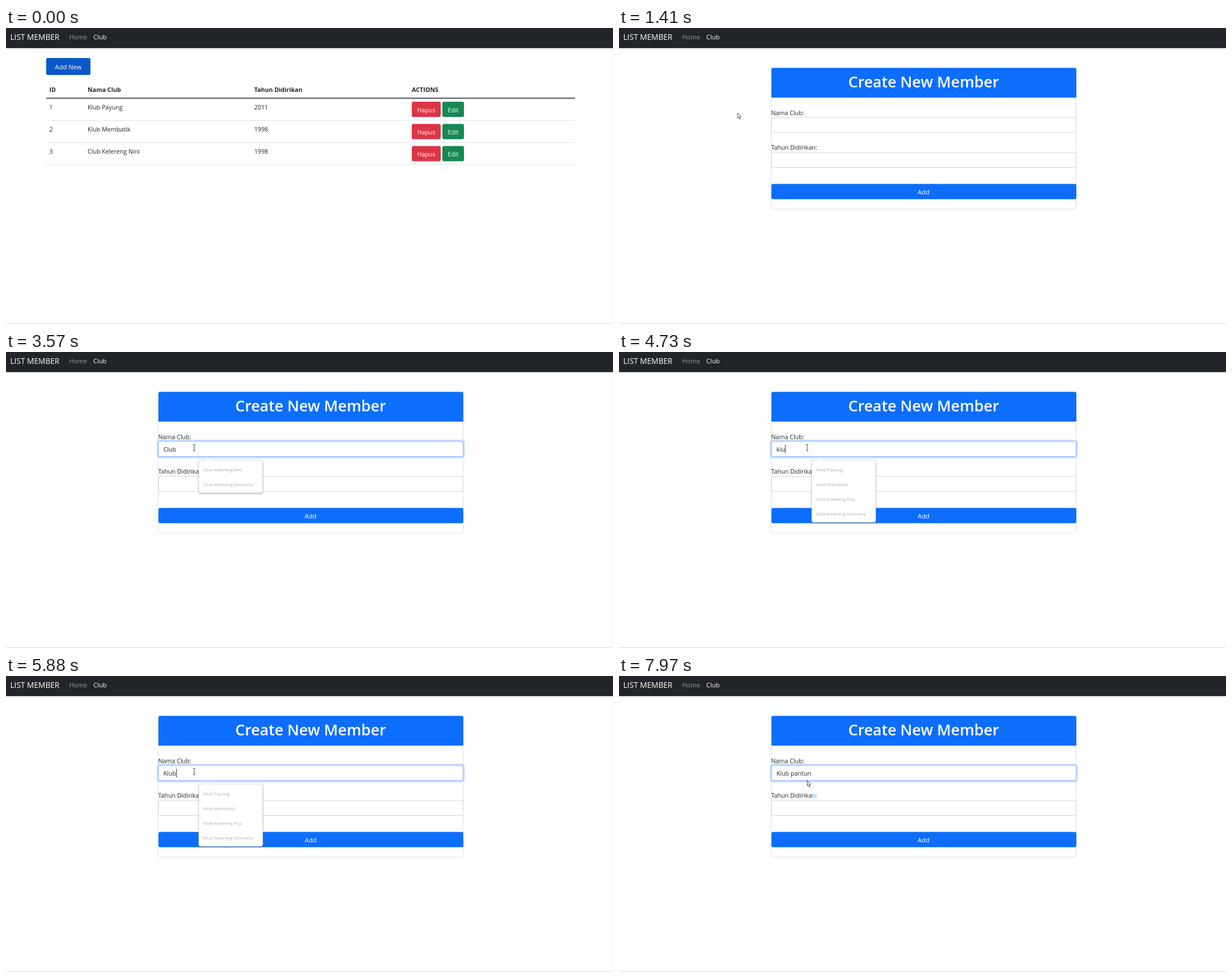
An HTML page for the animation above (8000 ms loop, 1071 px wide and 523 px high).

```html
<!DOCTYPE html>
<html lang="id">
<head>
<meta charset="utf-8">
<title>List Member</title>
<style>
  html, body { margin: 0; width: 100%; height: 100%; overflow: hidden; background: #fff; }
  svg { display: block; width: 100%; height: 100%; }
  text { font: 10.7px "Open Sans", "Noto Sans", sans-serif; fill: #212529; white-space: pre; }
  .bold { font-weight: 700; }
  .light { fill: #fff; }
  .wide { font-size: 11.2px; }
  .brand { font-size: 13.7px; }
  .title { font-size: 26.8px; font-weight: 600; }
  .middle { text-anchor: middle; }
  .suggestion { font-size: 8px; fill: #adadad; }
  .field { fill: #fff; stroke: #ced4da; }
  .menu { fill: #fff; stroke: #d6d6d6; stroke-width: .8; filter: drop-shadow(0 1px 1px #0005); }
</style>
</head>
<body>
<svg viewBox="0 0 1071 523">
  <rect x="1069.5" y="36" width="1.5" height="487" fill="#f8f8f8"/>
  <rect y="522" width="1071" height="1" fill="#d9d9d9"/>
  <rect width="1071" height="35.6" fill="#212529"/>
  <text class="light brand" x="7.5" y="21">LIST MEMBER</text>
  <text class="wide" x="111.5" y="20" style="fill:#9b9d9f">Home</text>
  <text class="light wide" x="154" y="20">Club</text>

  <g id="listPage">
    <rect id="buttonRing" x="69.5" y="51.5" width="81" height="33" rx="4" fill="none" stroke="#9ec5fe" stroke-width="3"/>
    <rect x="71" y="53" width="78" height="30" rx="3" fill="#0a58ca"/>
    <text class="light wide middle" x="110" y="73">Add New</text>
    <g id="table"></g>
  </g>

  <g id="formPage">
    <rect x="268.5" y="70.5" width="538" height="249.5" rx="3" fill="#fff" stroke="#dfdfdf"/>
    <path d="M269 123V73.5a3 3 0 0 1 3-3H804a3 3 0 0 1 3 3V123Z" fill="#0d6efd"/>
    <text class="light title middle" x="537.5" y="105">Create New Member</text>
    <text x="268.5" y="153.7">Nama Club:</text>
    <text x="268.5" y="215.4">Tahun Didirika<tspan id="labelEnd">n:</tspan></text>
    <rect class="field" x="269" y="157.9" width="537.5" height="26.8" rx="3"/>
    <rect class="field" x="269" y="219.6" width="537.5" height="26.8" rx="3"/>
    <rect id="focusBorder" x="269" y="157.9" width="537.5" height="26.8" rx="3" fill="none" stroke="#86b7fe"/>
    <rect id="focusRing" x="267.3" y="156.2" width="540.9" height="30.2" rx="4" fill="none" stroke="#c2dbfe" stroke-width="2.6"/>
    <rect x="269" y="275.4" width="538" height="27" rx="3" fill="#0d6efd"/>
    <text class="light wide middle" x="537.5" y="293.6">Add</text>
    <text id="typed" x="277.8" y="176.4"></text>
    <rect id="caret" y="164" width="1" height="15" fill="#212529"/>
    <g id="menu">
      <rect id="menuBox" class="menu" x="340" y="191" width="113" rx="3"/>
      <path d="M349.5 191.6L355.5 186L361.5 191.6" fill="#fff" stroke="#dcdcdc" stroke-width=".7"/>
      <g id="menuRows"></g>
    </g>
  </g>

  <circle id="click" r="8.7" cx="-1.2" fill="#fff03c"/>
  <path id="arrow" d="M0 0V9.3L2.1 7.4L3.7 10.9L5.2 10.3L3.7 6.8H6.4Z" fill="#fff" stroke="#222" stroke-width=".8"/>
  <path id="beam" d="M-2-5.5H-.6L0-5L.6-5.5H2M0-5V5M-2 5.5H-.6L0 5L.6 5.5H2" fill="none" stroke="#444" stroke-width="1"/>
</svg>
<script>
const LOOP = 8000, PAGE_SWITCH = 1090, FOCUS = 2020, STEP = 70, FADE = 210;
const $ = id => document.getElementById(id);
const clamp = v => Math.min(1, Math.max(0, v));
const label = (x, y, content, cls = "") => `<text class="${cls}" x="${x}" y="${y}">${content}</text>`;
const show = (id, visible) => { $(id).style.display = visible ? "" : "none"; };

const clubs = [
  ["Klub Payung", 2011],
  ["Klub Membatik", 1998],
  ["Club Kelereng Nini", 1998],
];
const suggestions = [
  "Klub Payung", "Klub Membatik", "Klub Kelereng Pop",
  "Klub Kelereng Nininana", "Club Kelereng Nininana", "Club Kelereng Nini",
];

// time, field content, indexes of the suggestions on view
const edits = [
  [FOCUS, "", "012345"],
  [2480, "C", "45"], [2750, "Cl", "54"], [2950, "Clu", "54"], [3020, "Club", "54"],
  [3640, "Clu", "54"], [4120, "Cl", "54"], [4190, "C", "54"], [4260, "", ""],
  [4460, "k", "0123"], [4530, "kl", "0123"], [4730, "klu", "0123"],
  [5000, "kl", "0123"], [5200, "k", "0123"], [5270, "", ""],
  [5540, "K", "0123"], [5680, "Kl", "0123"], [5810, "Klu", "0123"], [5880, "Klub", "0123"],
  [6030, "Klub ", "0123"], [6230, "Klub p", ""], [6700, "Klub pa", ""], [6900, "Klub pan", ""],
  [7100, "Klub pant", ""], [7230, "Klub pantu", ""], [7300, "Klub pantun", ""],
];

// time, x, y of the pointer
const route = [
  [130, 1010, 512], [470, 560, 290], [810, 95, 73], [PAGE_SWITCH, 95, 73],
  [1410, 209, 150], [1740, 338, 175], [2090, 338, 175], [2280, 332, 169],
  [7760, 332, 169], [7830, 328, 160], [7900, 330, 172], [7970, 332, 185],
];

function buildTable() {
  const columns = [76.5, 144, 438, 716];
  const rule = (y, color, width) =>
    `<path d="M71 ${y}H1004" stroke="${color}" stroke-width="${width}"/>`;
  const button = (x, y, width, color, content) =>
    `<rect x="${x}" y="${y}" width="${width}" height="27" rx="3" fill="${color}"/>` +
    label(x + width / 2, y + 18.7, content, "light middle");
  const head = ["ID", "Nama Club", "Tahun Didirikan", "ACTIONS"]
    .map((name, i) => label(columns[i], 113.4, name, "bold")).join("");
  const rows = clubs.map((club, i) => {
    const y = 124 + i * 39.2;
    return [i + 1, ...club].map((cell, c) => label(columns[c], y + 19.5, cell)).join("") +
      button(716, y + 6.2, 51, "#dc3545", "Hapus") +
      button(770, y + 6.2, 38, "#198754", "Edit") +
      rule(y + 39.3, "#dee2e6", 1);
  }).join("");
  $("table").innerHTML = head + rows + rule(124, "#212529", 1.4);
}

const lastIndex = (list, t) => list.findLastIndex(item => item[0] <= t);

function pointerAt(t) {
  const i = lastIndex(route, t);
  const [start, x, y] = route[i];
  const [end, nextX, nextY] = route[i + 1] || [start + 1, x, y];
  const p = clamp(Math.floor((t - start) / STEP) * STEP / (end - start));
  return [x + (nextX - x) * p, y + (nextY - y) * p];
}

function drawPointer(t) {
  const visible = t >= route[0][0];
  const [x, y] = visible ? pointerAt(t) : [0, 0];
  const overField = t >= PAGE_SWITCH && x > 269 && y > 158 && y < 185;
  const clicking = [880, FOCUS].some(start => t >= start && t < start + 2 * STEP);
  show("arrow", visible && !overField);
  show("beam", visible && overField);
  show("click", clicking);
  for (const id of ["arrow", "beam", "click"]) $(id).setAttribute("transform", `translate(${x} ${y})`);
}

function drawField(t) {
  const i = lastIndex(edits, t);
  const focused = i >= 0;
  const [time, content, open] = focused ? edits[i] : [0, "", ""];
  const since = t - time;

  $("focusBorder").style.opacity = clamp((t - FOCUS) / 140);
  $("focusRing").style.opacity = clamp((t - FOCUS - STEP) / 190);
  $("typed").textContent = content;
  $("caret").setAttribute("x", 278 + (content ? $("typed").getComputedTextLength() : 0));
  show("caret", focused && since < 550 && t < 7760);

  // a closing menu fades out with the rows it had
  const closing = focused && !open;
  const rows = closing ? edits[i - 1][2] : open;
  show("menu", rows && (!closing || since < FADE));
  $("menu").style.opacity = closing ? 1 - clamp(since / FADE) : 1;
  $("menuBox").setAttribute("height", 26 * rows.length + 6);
  $("menuRows").innerHTML = [...rows]
    .map((index, row) => label(348.3, 210.8 + row * 25.9, suggestions[index], "suggestion")).join("");
  $("labelEnd").style.fill = t >= 6440 ? "#3a7bc8" : "";
}

function draw(now) {
  const t = now % LOOP;
  const onForm = t >= PAGE_SWITCH;
  show("listPage", !onForm);
  show("formPage", onForm);
  show("buttonRing", t >= 950);
  if (onForm) drawField(t);
  drawPointer(t);
}

buildTable();
const begin = performance.now();
function tick() {
  draw(performance.now() - begin);
  requestAnimationFrame(tick);
}
tick();
</script>
</body>
</html>
```
